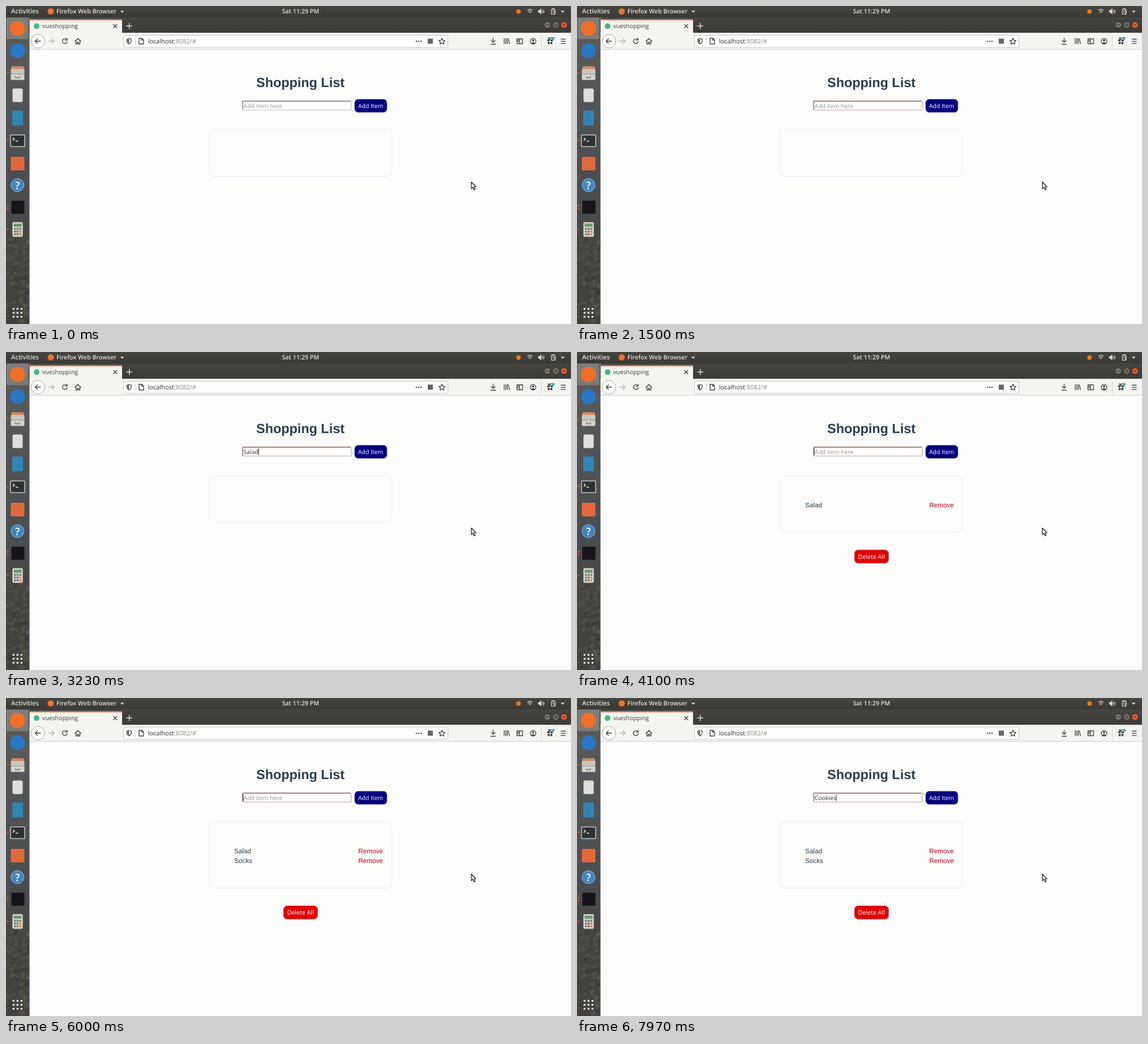
These frames come from a looping animation (998x561 px, 8 s). An HTML page:

```html
<!DOCTYPE html>
<html lang="en">
<head>
<meta charset="utf-8">
<title>Shopping List</title>
<style>
  html, body { margin: 0; width: 100%; height: 100%; overflow: hidden; background: #fcfdfa; }
  svg { display: block; width: 100vw; height: 100vh; }
  text { font-family: "Open Sans", "Noto Sans", sans-serif; white-space: pre; text-rendering: geometricPrecision; }
  .bar { font-weight: 600; fill: #e4e1da; }
  .page { font-family: "Liberation Sans", Arial, sans-serif; }
  .line { fill: none; stroke: #3f403e; stroke-width: 1.3; stroke-linecap: round; stroke-linejoin: round; }
</style>
</head>
<body>
<svg viewBox="0 0 998 561" preserveAspectRatio="none">
  <defs>
    <linearGradient id="top" x2="0" y2="1">
      <stop stop-color="#45443f"/><stop offset="1" stop-color="#3b3a36"/>
    </linearGradient>
    <linearGradient id="tabs" x2="0" y2="1">
      <stop stop-color="#45443f"/><stop offset="1" stop-color="#3c3b37"/>
    </linearGradient>
    <linearGradient id="dock" x2="0" y2="1">
      <stop stop-color="#5c5c59"/><stop offset=".3" stop-color="#515456"/>
      <stop offset=".62" stop-color="#494c4e"/><stop offset=".72" stop-color="#474640"/>
      <stop offset="1" stop-color="#42403a"/>
    </linearGradient>
    <clipPath id="dockClip"><path d="M0 20H41.500V561H0z"/></clipPath>
  </defs>

  <rect width="998" height="561" fill="#fcfdfa"/>

  <!-- desktop bar -->
  <rect width="998" height="20" fill="url(#top)"/>
  <text class="bar" x="9" y="13.400" font-size="11.200">Activities</text>
  <circle cx="79" cy="9.500" r="5.500" fill="#f0702a"/>
  <text class="bar" x="89" y="13.400" font-size="10.700">Firefox Web Browser</text>
  <path d="M202 8.300h6.600l-3.300 3.800z" fill="#dfdbd2"/>
  <text class="bar" x="520.300" y="13.400" font-size="10.700" text-anchor="middle">Sat 11:29 PM</text>
  <circle cx="905.300" cy="9.700" r="4" fill="#ee7a16"/>
  <g fill="none" stroke="#dfdbd2" stroke-width="1.200">
    <path d="M921 7.500q4.500-3.600 9 0M922.500 9.700q3-2.400 6 0M924 11.800q1.500-1.200 3 0"/>
    <path d="M940.500 8h2l2.500-2.500v8L942.500 11h-2z" fill="#dfdbd2"/>
    <path d="M947 7.500q1.500 2 0 4M949 6q2.600 3.500 0 7"/>
    <path d="M963.500 5.500h6v9h-6zM965 4.500h3M965 8h3M965 10.500h3"/>
    <path d="M970 8v3q0 2-2 3.500" stroke-width="1.600"/>
  </g>
  <path d="M980 8.300h6.600l-3.300 3.800z" fill="#dfdbd2"/>

  <!-- browser window -->
  <rect x="41.500" y="20" width="956.500" height="27.500" fill="url(#tabs)"/>
  <path d="M42 23.500H205V48H42z" fill="#f4f5f1"/>
  <path d="M42 23.500H205v1.700H42z" fill="#e9663b"/>
  <circle cx="54" cy="35.500" r="5" fill="#41b883"/>
  <text x="64" y="39.400" font-size="10.500" fill="#3a3b39">vueshopping</text>
  <path class="line" d="M189.800 32.500l6 6m0-6l-6 6"/>
  <path d="M212.500 35.300h10.500m-5.200-5.200v10.500" stroke="#e2dfd8" stroke-width="1.400"/>
  <g stroke="#2e2d29">
    <circle cx="956.300" cy="33.500" r="5.700" fill="#75736b"/>
    <circle cx="971" cy="33.500" r="5.700" fill="#75736b"/>
    <circle cx="985.700" cy="33.500" r="5.700" fill="#ea5b32"/>
    <path d="M953.800 33.500h5M969 31.800h4v3.500h-4zM983.700 31.500l4 4m0-4l-4 4" fill="none"/>
  </g>
  <rect x="41.500" y="47.500" width="956.500" height="29" fill="#f4f5f1"/>
  <path d="M41.500 76.500H998" stroke="#cfd0c8"/>
  <circle cx="56.300" cy="62" r="12" fill="#fdfdfb" stroke="#a9aaa4"/>
  <path class="line" d="M61 62h-9.500m4-4l-4 4 4 4"/>
  <path class="line" d="M75.500 62H85m-4-4l4 4-4 4" style="stroke:#b3b4ae"/>
  <path class="line" d="M107.300 59.200a4.300 4.300 0 1 0 .8 4M108 57v3.200h-3.200"/>
  <path class="line" d="M121.800 62.300l5.200-5 5.200 5M123.500 61.500v5.500h2.500v-3h2v3h2.500v-5.500"/>
  <rect x="207.500" y="51.500" width="573" height="21.500" rx="2" fill="#fefefc" stroke="#c4c5be"/>
  <path class="line" d="M213.300 58.500l4-1.200 4 1.200q.2 6-4 8.500-4.200-2.500-4-8.500z"/>
  <path d="M217.300 58.500v7.200q-3-2.200-2.900-6.300z" fill="#555"/>
  <path d="M228.500 55v14" stroke="#ccc"/>
  <path class="line" d="M235 57h5l3 3v7h-8zM239.800 57v3.200h3.200"/>
  <text x="250.700" y="66" font-size="11" fill="#2f302e">localhost<tspan fill="#8b8c88">:8082/#</tspan></text>
  <g fill="#555"><circle cx="725" cy="62.300" r="1.300"/><circle cx="729" cy="62.300" r="1.300"/><circle cx="733" cy="62.300" r="1.300"/></g>
  <rect x="745" y="57.500" width="9" height="9" fill="#666764"/>
  <path class="line" d="M770 56.700l1.600 3.600 3.900.4-2.900 2.600.8 3.900-3.400-2-3.400 2 .8-3.900-2.900-2.600 3.900-.4z"/>
  <path class="line" d="M860.500 56.500v7.500m-3.300-3.200l3.300 3.300 3.300-3.300M856.500 67.500h8"/>
  <path class="line" d="M880 57.500v9m2.800-9v9m2.700-9v9m1.800-8.500l2 8.500"/>
  <path class="line" d="M902.500 58h10v8.500h-10zM907 58v8.500M904 60.500h1.500M904 62.500h1.500"/>
  <circle class="line" cx="931" cy="62.200" r="5"/>
  <path d="M927.600 65.500q3.400-3 6.800 0-3.400 3-6.800 0z" fill="#444"/><circle cx="931" cy="60.700" r="2" fill="#444"/>
  <path d="M945.500 51v22" stroke="#d2d3cb"/>
  <path d="M956 59h4.300v3H956zm5.700 0h4.300v3h-4.300zM957 63.200h3.300v4H957zm4.700 0h3.300v4h-3.300z" fill="#3f403e"/>
  <path class="line" d="M961 58.500q-4-.5-3-2.300 2-1 3 2.300 1-3.300 3-2.300"/>
  <circle cx="966.700" cy="57" r="2.400" fill="#12b5dc"/>
  <path class="line" d="M980.500 58.500h7.500m-7.500 3.800h7.500m-7.500 3.800h7.500"/>

  <!-- dock -->
  <rect y="20" width="41.500" height="541" fill="url(#dock)"/>
  <g id="stone" clip-path="url(#dockClip)"></g>
  <rect x="1" y="20.500" width="38.500" height="38" rx="2" fill="#fff" opacity=".2"/>
  <circle cx="20.300" cy="39.500" r="13.500" fill="#f0702a"/>
  <circle cx="20.500" cy="79" r="13" fill="#2a78c4"/>
  <g>
    <path d="M10 106h21l2 8v15q0 2-2 2H10q-2 0-2-2v-15z" fill="#8f8d86"/>
    <path d="M11 107h19l1 4H10z" fill="#df8550"/>
    <rect x="9" y="111" width="23" height="8.500" rx="1" fill="#c9c7c0"/>
    <rect x="9" y="120.500" width="23" height="9.500" rx="1" fill="#d6d4cd"/>
    <path d="M17 123.500v3h7v-3" fill="none" stroke="#77756e" stroke-width="1.300"/>
  </g>
  <rect x="11.500" y="145.500" width="18" height="24" rx="3" fill="#dfdeda"/>
  <rect x="11" y="184.500" width="19" height="26" fill="#2f86b5"/>
  <rect x="8" y="227.500" width="25" height="20.500" rx="1" fill="#2c3234" stroke="#c9c9c5" stroke-width="1.500"/>
  <path d="M12 232.500l3 2.500-3 2.500M17 238.500h4.500" fill="none" stroke="#f2f2ee" stroke-width="1.500"/>
  <rect x="8.500" y="266" width="24" height="24" rx="2" fill="#e2693b"/>
  <circle cx="20.300" cy="316" r="11.500" fill="#4285bd" stroke="#8fb8d8"/>
  <text x="20.300" y="322.500" font-size="18" font-weight="600" text-anchor="middle" fill="#fff">?</text>
  <rect x="9.500" y="343.500" width="23" height="23" fill="#15131c"/>
  <rect x="11.500" y="381.500" width="18" height="25.500" rx="2" fill="#d9d8d2" stroke="#aaa9a2" stroke-width=".8"/>
  <rect x="13.500" y="384" width="14" height="5.500" fill="#6b9a70"/>
  <g id="keys"></g>
  <g id="marks" fill="#e4552d"></g>
  <g id="apps" fill="#f1f1ed"></g>

  <!-- page -->
  <text class="page" x="520" y="142.600" font-size="23.400" font-weight="700" text-anchor="middle" fill="#2c3e50">Shopping List</text>
  <rect id="field" x="417.700" y="167.700" width="192.300" height="15.800" rx="2" fill="#fefefc"/>
  <path id="edgeA" d="M418 183V169.500q0-1.800 1.800-1.800H609" fill="none" stroke-width="1.400"/>
  <path id="edgeB" d="M609 167.700q1 .3 1 1.800v12.200q0 1.800-1.800 1.800H419.500q-1.500 0-1.800-1.200" fill="none" stroke-width="1.200"/>
  <text id="typed" x="419.600" y="179.500" font-size="10.400"></text>
  <path id="caret" stroke="#222"/>
  <rect x="615.800" y="164.300" width="57.200" height="23.500" rx="6.500" fill="#00007e" stroke="#8d8db8" stroke-width=".9"/>
  <text x="644" y="179.600" font-size="10.400" text-anchor="middle" fill="#fff">Add Item</text>
  <rect id="box" x="359.300" y="218.200" width="322.300" rx="8" fill="#fcfcfb" stroke="#ececf5"/>
  <g id="rows"></g>
  <g id="wipe">
    <rect x="490" y="349" width="60.500" height="23.700" rx="6.500" fill="#e20000" stroke="#bf8f8f" stroke-width=".9"/>
    <text x="520" y="364.600" font-size="10.700" text-anchor="middle" fill="#fff">Delete All</text>
  </g>
  <path d="M822 310.500v11.800l2.700-2.500 2 4.600 2-.9-2-4.500h3.600z" fill="#fff" stroke="#1c1c1c" stroke-width="1.200" stroke-linejoin="round"/>
</svg>
<script>
const LOOP = 8000, FOCUS = 500, BLINK = 600, ROW = 17.5;
const entries = [
  { word: "Salad", keys: [2200, 2480, 2700, 2950, 3150], enter: 3550 },
  { word: "Socks", keys: [4500, 4700, 4920, 5100, 5300], enter: 5600 },
  { word: "Cookies", keys: [6500, 6750, 6930, 7150, 7400, 7600, 7850], enter: Infinity }
];
const $ = id => document.getElementById(id);
const set = (el, attrs) => { for (const k in attrs) el.setAttribute(k, attrs[k]); };
function add(parent, tag, attrs, text = "") {
  const el = document.createElementNS("http://www.w3.org/2000/svg", tag);
  set(el, attrs);
  el.textContent = text;
  parent.append(el);
  return el;
}

let seed = 7;
const rand = () => (seed = seed * 16807 % 2147483647) / 2147483647;
for (let i = 0; i < 110; i++) {
  const cx = rand() * 42, cy = 410 + rand() * 150;
  add($("stone"), "ellipse", {
    cx, cy, rx: 1.5 + rand() * 5, ry: 1 + rand() * 3,
    fill: rand() < .55 ? "#24231f" : "#7d786a", opacity: .2,
    transform: `rotate(${-40 + rand() * 30} ${cx} ${cy})`
  });
}
for (let r = 0; r < 3; r++) for (let c = 0; c < 3; c++) {
  add($("keys"), "rect", { x: 14 + c * 4.7, y: 391.5 + r * 4.8, width: 3.5, height: 3.3,
    fill: c === 2 && r > 0 ? "#e77a3c" : "#77766f" });
  add($("apps"), "circle", { cx: 13.3 + c * 7, cy: 534.3 + r * 7, r: 1.8 });
}
for (const y of [118, 237, 352, 357, 394]) add($("marks"), "circle", { cx: 3, cy: y, r: 1.5 });

const rows = entries.slice(0, 2).map(({ word }, i) => {
  const g = add($("rows"), "g", {});
  const style = { y: 273.8 + i * ROW, class: "page", "font-size": 11.7 };
  add(g, "text", { ...style, x: 403, fill: "#2c3e50" }, word);
  add(g, "text", { ...style, x: 622.3, fill: "#c00018" }, "Remove");
  return g;
});

function draw(t) {
  const count = entries.filter(e => t >= e.enter).length;
  const { word, keys } = entries[count];
  const text = word.slice(0, keys.filter(k => t >= k).length);
  const focused = t >= FOCUS;
  const last = Math.max(FOCUS, ...entries.flatMap(e => [...e.keys, e.enter]).filter(k => k <= t));

  $("typed").textContent = text || "Add item here";
  set($("typed"), { fill: text ? "#30312f" : "#969793" });
  set($("edgeA"), { stroke: focused ? "#8d6060" : "#767773" });
  set($("edgeB"), { stroke: focused ? "#cf9fb4" : "#c3c3c3" });
  const x = text ? 420 + $("typed").getComputedTextLength() : 419;
  const on = focused && Math.floor((t - last) / BLINK) % 2 === 0;
  set($("caret"), { d: `M${x} 169.800V181.600`, visibility: on ? "visible" : "hidden" });

  rows.forEach((g, i) => set(g, { visibility: i < count ? "visible" : "hidden" }));
  set($("box"), { height: 82.3 + count * ROW });
  set($("wipe"), { visibility: count ? "visible" : "hidden", transform: `translate(0 ${(count - 1) * ROW})` });
}

const start = performance.now();
function tick() {
  draw((performance.now() - start) % LOOP);
  requestAnimationFrame(tick);
}
tick();
</script>
</body>
</html>
```
